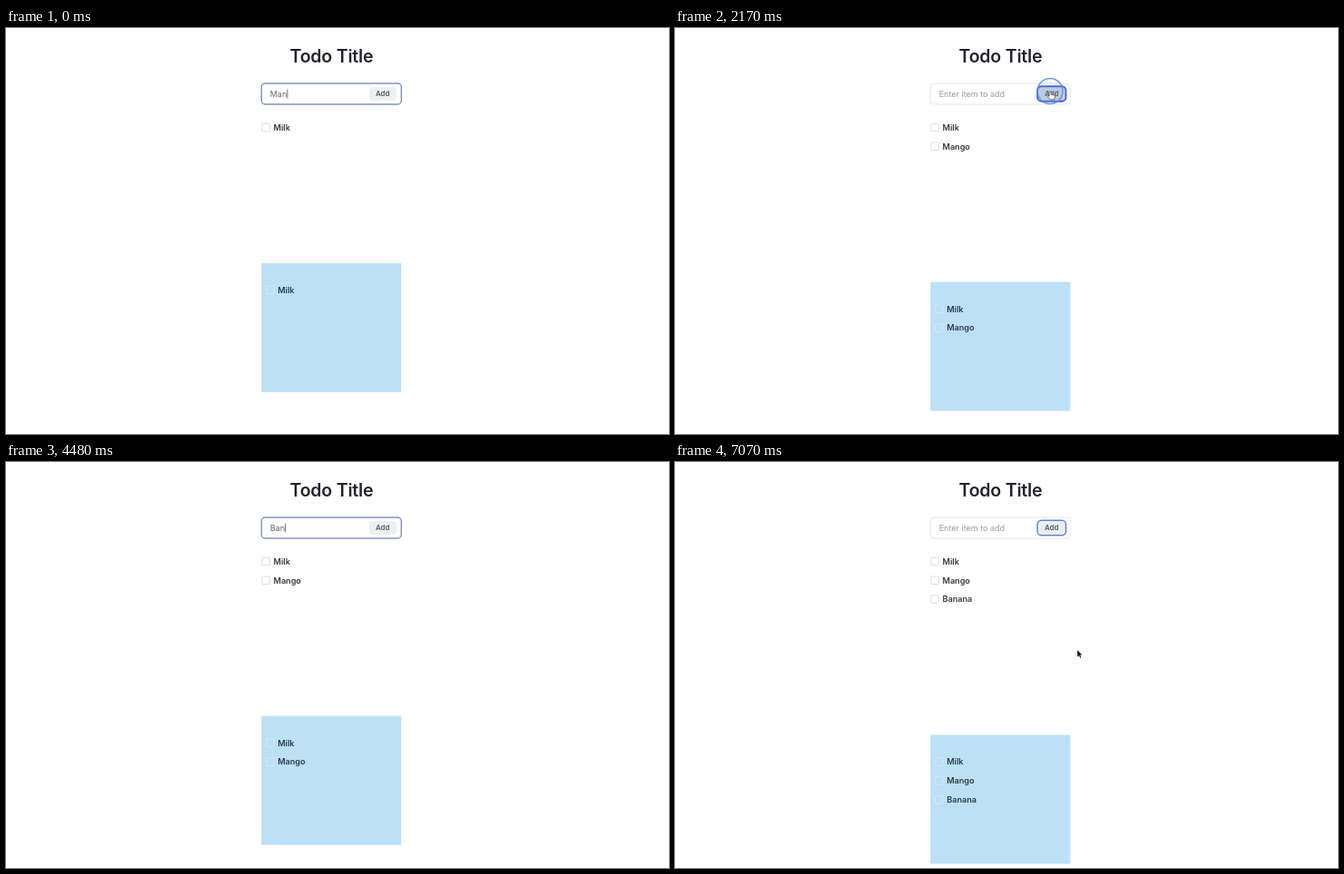
Recreate the animation shown at these times as an HTML page with a canvas. Size 730 by 447 pixels, loop 7.21 s.

```html
<!DOCTYPE html>
<html lang="en">
<head>
<meta charset="utf-8">
<title>Todo</title>
<style>
  html, body { margin: 0; width: 100%; height: 100%; overflow: hidden; background: #fff; }
  canvas { display: block; width: 730px; height: 447px; }
</style>
</head>
<body>
<canvas id="stage"></canvas>
<script>
const W = 730, H = 447, LOOP = 7210, STEP = 70;
const canvas = document.getElementById('stage');
const ctx = canvas.getContext('2d');
const dpr = window.devicePixelRatio || 1;
canvas.width = W * dpr;
canvas.height = H * dpr;

const ROW = 20.8;
const ADDS = [2100, 5740];
const FOCUS = 3500;
const CLICKS = [2030, FOCUS, 5670];
const ITEMS = ['Milk', 'Mango', 'Banana'];

// Moments at which the input's text changes
const TYPING = [
  [0, 'Man'], [840, 'Mang'], [910, 'Mango'], [ADDS[0], ''],
  [4200, 'B'], [4340, 'Ba'], [4480, 'Ban'], [4760, 'Bana'], [4900, 'Banan'], [5040, 'Banana'],
  [ADDS[1], '']
];
const CARET_ON = [[0, 350], [630, 1400], [FOCUS, 5320]];

// Pointer trips as [time, x, y]; hidden in between while typing
const TRIPS = [
  [[1330, 350, 78], [1540, 408, 98], [1820, 405, 70], [2030, 413, 69.5],
   [3220, 413, 69.5], [3500, 351.5, 70], [4130, 351.5, 70]],
  [[5250, 372, 74], [5390, 418, 82], [5600, 423, 80], [6300, 423, 80], [7070, 443, 207], [LOOP, 443, 207]]
];

const ARROW = new Path2D('M0 0V7.6L1.8 6 3.1 8.8 4.3 8.2 3.1 5.6H5.4Z');
const HAND = new Path2D('M-1 .6Q0-.4 1 .6V3.6L4.6 4.4Q5.6 4.8 5.4 6L4.6 9.4H.2L-3 5.8Q-3 4.6-2 4.9L-1 5.8Z');
const BEAM = new Path2D('M-1.8-4.6Q0-4.6 0-3.6V3.6Q0 4.6-1.8 4.6M1.8-4.6Q0-4.6 0-3.6M0 3.6Q0 4.6 1.8 4.6');

const smooth = p => p * p * (3 - 2 * p);

function text(str, x, y, size, weight, color, align = 'left', spacing = 0) {
  ctx.font = `${weight} ${size}px Inter, sans-serif`;
  ctx.letterSpacing = spacing + 'px';
  ctx.textAlign = align;
  ctx.fillStyle = color;
  ctx.fillText(str, x, y);
}

function box(x, y, w, h, r, fill, stroke, line = 1) {
  ctx.beginPath();
  ctx.roundRect(x, y, w, h, r);
  if (fill) { ctx.fillStyle = fill; ctx.fill(); }
  if (stroke) { ctx.strokeStyle = stroke; ctx.lineWidth = line; ctx.stroke(); }
}

function pointerAt(t) {
  const trip = TRIPS.find(k => t >= k[0][0] && t < k[k.length - 1][0]);
  if (!trip) return null;
  const i = trip.findIndex(k => k[0] > t);
  const [t0, x0, y0] = trip[i - 1], [t1, x1, y1] = trip[i];
  const p = smooth((t - t0) / (t1 - t0));
  const x = x0 + (x1 - x0) * p, y = y0 + (y1 - y0) * p;
  const overButton = x > 399 && x < 431 && y > 64 && y < 81;
  const overInput = x > 281 && x <= 399 && y > 61 && y < 84;
  return { x, y, overButton, overInput };
}

function drawPointer({ x, y, overButton, overInput }) {
  ctx.save();
  ctx.translate(x, y);
  if (overButton) {
    ctx.fillStyle = '#f7f8fa';
    ctx.strokeStyle = '#555b66';
    ctx.lineWidth = 0.9;
    ctx.fill(HAND);
    ctx.stroke(HAND);
  } else if (overInput) {
    ctx.strokeStyle = '#555';
    ctx.lineWidth = 0.9;
    ctx.stroke(BEAM);
  } else {
    ctx.fillStyle = '#222';
    ctx.fill(ARROW);
  }
  ctx.restore();
}

function drawRipple(t, { x, y }) {
  const start = CLICKS.find(c => t >= c && t < c + 420);
  if (start === undefined) return;
  const age = t - start;
  const p = Math.max(0, (age - 140) / 280);
  ctx.beginPath();
  ctx.arc(x, y, age < 70 ? 12 : 14 + 4 * Math.min(1, p * 2), 0, 7);
  ctx.fillStyle = `rgba(120,160,225,${0.1 * (1 - p)})`;
  ctx.fill();
  ctx.strokeStyle = `rgba(95,140,220,${0.85 * (1 - p)})`;
  ctx.lineWidth = 1.5 - 0.6 * p;
  ctx.stroke();
}

function drawInput(t, focused) {
  box(281.3, 61, 154, 23, 4, '#fff', focused ? '#8295bb' : '#e9e9ec', focused ? 1.5 : 1);
  const typed = TYPING.filter(k => k[0] <= t).pop()[1];
  text(typed || 'Enter item to add', 290.7, 75.7, 9, 400, typed ? '#686868' : '#9b9b9b');
  if (focused && CARET_ON.some(([from, to]) => t >= from && t < to)) {
    const x = 291 + (typed && ctx.measureText(typed).width);
    ctx.fillStyle = '#555';
    ctx.fillRect(x, 67.5, 0.8, 10);
  }
}

function drawButton(t, focused, pointer) {
  const pressed = CLICKS.some((c, i) => i !== 1 && t >= c && t < c + 210);
  const hover = pointer && pointer.overButton;
  const fill = pressed ? '#c6d0de' : hover ? '#e2e8f2' : focused ? '#eff0f3' : '#ebeff5';
  if (focused) box(400, 65, 30, 15, 4, fill, hover && '#b4c3e2');
  else box(399, 64.3, 31.4, 16.4, 4.5, fill, pressed ? '#4569d4' : '#6685d6', pressed ? 1.9 : 1.5);
  text('Add', 414.7, 75.4, 7.8, 600, '#555a62', 'center');
}

function drawList(items, x, y, border, color) {
  items.forEach((item, i) => {
    const cy = y + i * ROW;
    box(x, cy - 4.3, 8.6, 8.6, 1.2, null, border);
    text(item, x + 12.6, cy + 3.2, 9.1, 600, color);
  });
}

function draw(t) {
  ctx.setTransform(dpr, 0, 0, dpr, 0, 0);
  ctx.fillStyle = '#fff';
  ctx.fillRect(0, 0, W, H);

  const added = ADDS.filter(a => t >= a).length;
  const items = ITEMS.slice(0, added + 1);
  const focused = t < CLICKS[0] || (t >= FOCUS && t < CLICKS[2]);
  const pointer = pointerAt(t);

  text('Todo Title', 358.4, 37.6, 19.5, 600, '#22222b', 'center', -0.2);
  drawInput(t, focused);
  drawButton(t, focused, pointer);
  drawList(items, 281.9, 109.5, '#dedee0', '#3a3a3c');

  const top = 258.8 + added * ROW;
  ctx.fillStyle = '#bce0f6';
  ctx.fillRect(281.2, top, 154, 142);
  drawList(items, 286.6, top + 29.8, 'rgba(225,240,250,.6)', '#2a3d48');

  if (pointer) {
    drawRipple(t, pointer);
    drawPointer(pointer);
  }
}

function tick() {
  const t = performance.now() % LOOP;
  draw(Math.floor(t / STEP) * STEP);
  requestAnimationFrame(tick);
}
tick();
</script>
</body>
</html>
```
